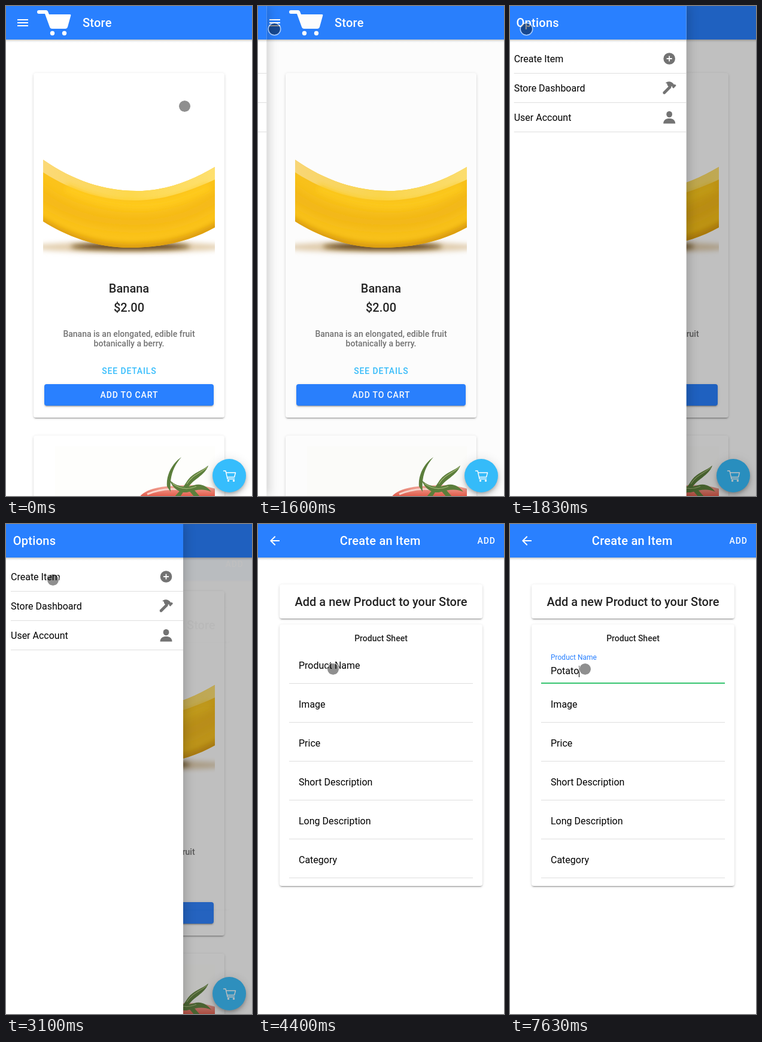
Animation, 411 px wide and 819 px high, one loop 8000 ms. Source, as an HTML page:

```html
<!DOCTYPE html>
<html lang="en">
<head>
<meta charset="utf-8">
<title>Store</title>
<style>
  :root { --blue: #2980ff; --sky: #36bdfc; --ink: #242424; --line: #dedede; }
  html, body { margin: 0; width: 100%; height: 100%; overflow: hidden; background: #fff; }
  #stage { position: relative; width: 411px; height: 819px; overflow: hidden; }
  #stage div, #stage svg { position: absolute; }
  .page, svg, #shade { left: 0; top: 0; width: 411px; height: 819px; }
  .page { background: #fff; }
  svg { overflow: hidden; font-family: Roboto, "Open Sans", sans-serif; }
  .bar { left: 0; top: 0; width: 100%; height: 56px; background: var(--blue); }
  .bar::after {
    content: ""; position: absolute; left: 0; top: 56px; width: 100%; height: 5px;
    background: linear-gradient(rgba(0,0,0,.24), rgba(0,0,0,.07) 50%, transparent);
  }
  .card, .button {
    border-radius: 4px; background: #fff;
    box-shadow: 0 3px 1px -2px rgba(0,0,0,.2), 0 2px 2px rgba(0,0,0,.14), 0 1px 5px rgba(0,0,0,.12);
  }
  .button { background: var(--blue); }
  .fab {
    left: 345px; top: 757px; width: 56px; height: 56px; border-radius: 50%; background: var(--sky);
    box-shadow: 0 3px 5px -1px rgba(0,0,0,.2), 0 6px 10px rgba(0,0,0,.14), 0 1px 18px rgba(0,0,0,.12);
  }
  #shade { background: #000; }
  #menu { left: 0; top: 0; width: 296px; height: 819px; background: #fff; box-shadow: 4px 0 16px rgba(0,0,0,.18); }
  .title { font-size: 20px; font-weight: 500; letter-spacing: .25px; fill: #fff; }
  .head { font-size: 20px; font-weight: 500; fill: var(--ink); }
  .sub { font-size: 14px; font-weight: 500; fill: var(--ink); }
  .note { font-size: 14px; font-weight: 500; fill: #737373; }
  .caps { font-size: 14px; font-weight: 500; letter-spacing: .84px; fill: #fff; }
  .item { font-size: 16px; fill: #000; white-space: pre; }
  .mid { text-anchor: middle; }
</style>
</head>
<body>
<div id="stage">
  <div class="page" id="store">
    <div class="card" style="left:46px;top:112px;width:319px;height:576px"></div>
    <div class="card" style="left:46px;top:718px;width:319px;height:576px"></div>
    <div class="button" style="left:64px;top:632px;width:283px;height:36px"></div>
    <div class="bar"></div>
    <svg viewBox="0 0 411 819">
      <defs>
        <filter id="soft" x="-30%" y="-60%" width="160%" height="220%"><feGaussianBlur stdDeviation="4"/></filter>
        <filter id="softer" x="-30%" y="-60%" width="160%" height="220%"><feGaussianBlur stdDeviation="9"/></filter>
        <clipPath id="photo"><rect x="62" y="128" width="287" height="300"/></clipPath>
        <clipPath id="photo2"><rect x="62" y="734" width="287" height="85"/></clipPath>
        <path id="peel" d="M62 257C112 292 165 309 218 309C268 309 310 292 349 269V370C310 392 262 404 207 404C150 404 100 384 62 360Z"/>
        <clipPath id="inPeel"><use href="#peel"/></clipPath>
        <linearGradient id="facet">
          <stop stop-color="#fbd978"/><stop offset=".5" stop-color="#fdd84c"/><stop offset="1" stop-color="#fee070"/>
        </linearGradient>
        <linearGradient id="tomato" x2="0" y2="1">
          <stop stop-color="#f3b0a2"/><stop offset="1" stop-color="#e2503f"/>
        </linearGradient>
      </defs>

      <g fill="#fff">
        <path d="M19 22h18v2H19zM19 27h18v2H19zM19 32h18v2H19z"/>
        <path d="M55 7H67Q69 7 70 9L72 14H107Q109 14 108 17L103 35Q102 38 99 38H77Q74 38 73 35L65 13H55A3 3 0 0 1 55 7Z"/>
        <circle cx="77.500" cy="45.500" r="3.700"/><circle cx="97.500" cy="45.500" r="3.700"/>
      </g>
      <text class="title" x="128" y="35">Store</text>

      <g clip-path="url(#photo)">
        <ellipse cx="205" cy="403" rx="165" ry="9" fill="#e3cfae" filter="url(#soft)"/>
        <ellipse cx="208" cy="402" rx="100" ry="6" fill="#5f3d0a" filter="url(#soft)"/>
        <use href="#peel" fill="#fbc31b"/>
        <g clip-path="url(#inPeel)">
          <path d="M40 300C90 345 150 362 215 362S320 345 370 310" fill="none" stroke="#f4b817" stroke-width="22" filter="url(#softer)"/>
          <path d="M40 350C95 388 150 405 207 405S315 393 365 362" fill="none" stroke="#dd9d0c" stroke-width="16" filter="url(#soft)"/>
          <path d="M62 278C115 312 165 325 215 325C265 325 310 308 349 290V250H62Z" fill="url(#facet)"/>
          <path d="M100 304C150 326 185 333 225 333S300 320 340 302" fill="none" stroke="#ffcb1f" stroke-width="12" filter="url(#soft)"/>
        </g>
      </g>

      <text class="head mid" x="205.500" y="479">Banana</text>
      <text class="head mid" x="205.500" y="511">$2.00</text>
      <text class="note mid" x="205.500" y="553">Banana is an elongated, edible fruit</text>
      <text class="note mid" x="205.500" y="569">botanically a berry.</text>
      <text class="caps mid" x="205.900" y="615" style="fill:var(--sky)">SEE DETAILS</text>
      <text class="caps mid" x="205.900" y="655">ADD TO CART</text>

      <g clip-path="url(#photo2)">
        <rect x="82" y="736" width="267" height="83" fill="#fefefc"/>
        <path d="M222 822C230 810 250 803 282 802C312 799 335 801 352 808V822Z" fill="url(#tomato)"/>
        <path d="M236 816Q262 805 290 808" fill="none" stroke="#f9d5cc" stroke-width="3"/>
        <g fill="#5c7f3c">
          <path d="M293 754C278 764 267 784 269 803L275 812C273 788 279 770 293 754Z"/>
          <path d="M338 768C328 777 314 779 304 792L296 804L303 807C312 790 332 786 338 768Z"/>
          <path d="M274 793C284 802 296 806 314 801C326 797 336 803 343 812C328 806 318 809 302 813C288 814 277 804 274 793Z"/>
          <path d="M302 803L290 822H280L296 804ZM310 804L326 822H316L304 808Z"/>
        </g>
        <path d="M336 771C325 781 312 783 302 799M278 798Q296 812 318 803" fill="none" stroke="#a5b878" stroke-width="1.200"/>
      </g>
    </svg>
    <div class="fab"></div>
    <svg viewBox="0 0 411 819">
      <g fill="none" stroke="#fff" stroke-width="1.400" stroke-linejoin="round" stroke-linecap="round">
        <path d="M363.500 777H367L370 790.500H381.500M367.700 780H383.500L381.500 787.500H369.300"/>
        <circle cx="371.500" cy="793.500" r="1"/><circle cx="380.500" cy="793.500" r="1"/>
      </g>
    </svg>
  </div>

  <div class="page" id="create">
    <div class="card" style="left:36px;top:101px;width:339px;height:57px"></div>
    <div class="card" style="left:36px;top:168px;width:339px;height:437px"></div>
    <div class="bar"></div>
    <svg viewBox="0 0 411 819">
      <path d="M36 27H23.800L29.400 21.400L28 20L20 28L28 36L29.400 34.600L23.800 29H36Z" fill="#fff"/>
      <text class="title mid" x="204.200" y="35">Create an Item</text>
      <text class="caps" x="366.500" y="33">ADD</text>
      <text class="head mid" x="205.500" y="137">Add a new Product to your Store</text>
      <text class="sub mid" x="205.500" y="196">Product Sheet</text>
      <g id="fields"></g>
      <text class="item" id="label">Product Name</text>
      <rect id="focus" x="52" y="265" width="307" height="2" fill="#36c46f"/>
      <text class="item" id="typed" x="68" y="251"></text>
      <rect id="caret" y="237" width="1" height="19"/>
    </svg>
  </div>

  <div id="shade"></div>
  <div id="menu">
    <div class="bar"></div>
    <svg viewBox="0 0 411 819">
      <text class="title" x="11.800" y="35">Options</text>
      <text class="item" x="8" y="94">Create Item</text>
      <text class="item" x="8" y="143">Store Dashboard</text>
      <text class="item" x="8" y="192">User Account</text>
      <path d="M8 112h288v1H8zM8 161h288v1H8zM8 210h288v1H8z" fill="#dedede"/>
      <g fill="#737373">
        <circle cx="267.500" cy="88" r="9.800"/>
        <path d="M267.500 83.500v9M263 88h9" stroke="#fff" stroke-width="1.800"/>
        <path d="M259 145L268.500 135.500" stroke="#737373" stroke-width="4.600" stroke-linecap="round"/>
        <path d="M261 128.500Q268 124 273.500 129L275.500 131.500L277 130.800L279 133L274.500 137.800L272.300 135.800L272.500 134L267 136L264 132Q264.500 129 261 128.500Z"/>
        <ellipse cx="267.500" cy="181" rx="4.900" ry="5.300"/>
        <path d="M257.500 196.500C257.500 190.500 262 188 267.500 188S277.500 190.500 277.500 196.500Z"/>
      </g>
    </svg>
  </div>

  <svg viewBox="0 0 411 819">
    <g id="pointer">
      <g id="dot">
        <circle r="9.600" fill="#000" fill-opacity=".44"/>
        <circle r="10.300" fill="none" stroke="#fff" stroke-opacity=".6" stroke-width="1.500"/>
      </g>
      <path id="cross" fill="#000" stroke="#fff" stroke-width="1.500" paint-order="stroke"
        d="M0-7.500L3-4.500H1V-1H4.500V-3L7.500 0L4.500 3V1H1V4.500H3L0 7.500L-3 4.500H-1V1H-4.500V3L-7.500 0L-4.500-3V-1H-1V-4.500H-3Z"/>
    </g>
  </svg>
</div>

<script>
const LOOP = 8000;
const $ = id => document.getElementById(id);
const el = {};
for (const id of ["store", "create", "shade", "menu", "label", "focus", "typed", "caret", "pointer", "dot", "cross"]) el[id] = $(id);

$("fields").innerHTML = ["", "Image", "Price", "Short Description", "Long Description", "Category"]
  .map((name, i) => `<text class="item" x="68" y="${242 + 65 * i}">${name}</text>
    <rect x="52" y="${266 + 65 * i}" width="307" height="1" fill="#dedede"/>`).join("");

const clamp = v => Math.min(1, Math.max(0, v));
const smooth = v => v * v * (3 - 2 * v);
const show = (node, on) => { node.style.display = on ? "" : "none"; };
const lastBefore = (list, t) => list.filter(v => v <= t).pop();

function bezier(x1, y1, x2, y2) {
  const at = (a, b, s) => 3 * a * s * (1 - s) ** 2 + 3 * b * s * s * (1 - s) + s ** 3;
  return v => {
    if (v <= 0 || v >= 1) return clamp(v);
    let lo = 0, hi = 1;
    for (let i = 0; i < 30; i++) {
      const m = (lo + hi) / 2;
      if (at(x1, x2, m) < v) lo = m; else hi = m;
    }
    return at(y1, y2, lo);
  };
}
const slide = bezier(0, 0, .2, 1);
const enter = bezier(.36, .66, .04, 1);

// start, end, x, y
const moves = [
  [233, 833, 107.5, 66], [1133, 1200, 27.5, 38.5], [2400, 2600, 73, 83], [2765, 2766, 78.5, 93.5],
  [3867, 4133, 119.5, 225.5], [4265, 4266, 126.5, 237], [4398, 4399, 125.5, 242.5]
];
function pointerAt(t) {
  let x = 298.5, y = 167.5;
  for (const [a, b, nx, ny] of moves) {
    const p = smooth(clamp((t - a) / (b - a)));
    x += (nx - x) * p;
    y += (ny - y) * p;
  }
  return [x, y];
}

const holds = [3100, 3200, 3300, 3370, 3400];
const keys = [[6200, 1], [6400, 2], [6900, 4], [7100, 5], [7630, 6]];
const caretSpans = [[4670, 5170], [5670, 6170], [6200, 7600], [7630, LOOP]];

function menuOpen(t, tick) {
  if (t < 1600 || t >= 3400) return 0;
  if (t < 1900) return slide((tick - 1597) / 260);
  return t < 3100 ? 1 : 1 - slide((lastBefore(holds, t) - 3129) / 300);
}

function draw(t) {
  const tick = Math.floor(t * .03 + .15) / .03;   // 30 pictures a second

  const open = menuOpen(t, tick);
  show(el.menu, open > 0);
  el.menu.style.transform = `translateX(${-296 * (1 - open)}px)`;
  el.shade.style.opacity = .25 * open;

  const page = t < 3100 ? 0 : t >= 3400 ? 1 : enter((lastBefore(holds, t) - 3095) / 280);
  show(el.store, page < 1);
  show(el.create, page > 0);
  el.create.style.opacity = page;
  el.create.style.transform = page < 1 ? `translateY(${40 * (1 - page)}px)` : "none";

  const focused = t >= 4670;
  const lift = t >= 4800 ? 1 : focused ? .3 : 0;
  el.label.setAttribute("transform", `translate(68 ${242 - 15 * lift}) scale(${1 - .25 * lift})`);
  el.label.style.fill = focused ? "var(--blue)" : "#000";
  show(el.focus, focused);

  const count = keys.reduce((n, [at, k]) => t >= at ? k : n, 0);
  el.typed.textContent = "Potato".slice(0, count);
  const width = count ? el.typed.getComputedTextLength() : 0;
  el.caret.setAttribute("x", Math.round(68 + width));
  show(el.caret, caretSpans.some(([a, b]) => t >= a && t < b));

  el.pointer.setAttribute("transform", `translate(${pointerAt(tick)})`);
  const crossed = t >= 5930 && t < 6170;
  show(el.dot, !crossed);
  show(el.cross, crossed);
}

const start = performance.now();
function frame() {
  draw((performance.now() - start) % LOOP);
  requestAnimationFrame(frame);
}
frame();
</script>
</body>
</html>
```
